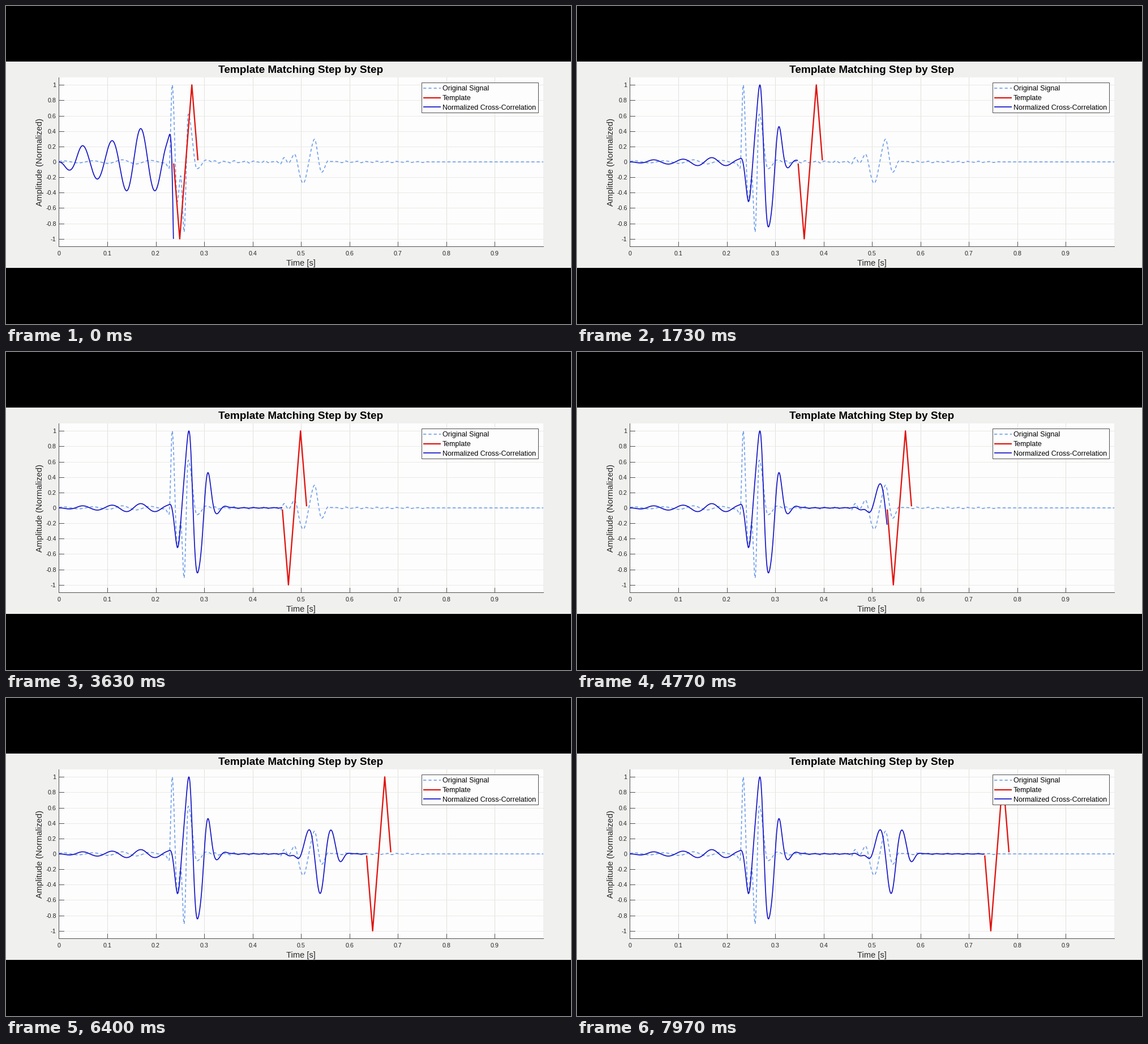
A matplotlib script that plays this animation: 998x561 px, repeating every 8 s.

```python
import numpy as np
import matplotlib
import matplotlib.pyplot as plt
from matplotlib.animation import FuncAnimation
from matplotlib.patches import Rectangle

W, H, DPI = 998, 561, 64
PT = 72 / DPI                      # points per pixel
FRAMES, LOOP_MS = 240, 8000
DT = 0.0005                        # sampling step, s
DARK, AXIS = "#262626", "#505050"
SKY, RED, BLUE = "#6a9bea", "#e0140f", "#1212c6"

matplotlib.rcParams["font.family"] = "Liberation Sans"


def px(t):
    return 93.4 + 855.6 * np.asarray(t)


def py(v):
    return 275 - 135.8 * np.asarray(v)


def swing(t, turns):
    """Smooth curve that eases from one turning point to the next."""
    x, y = np.array(turns).T
    i = np.clip(np.searchsorted(x, t, side="right") - 1, 0, len(x) - 2)
    u = np.clip((t - x[i]) / (x[i + 1] - x[i]), 0, 1)
    return y[i] + (y[i + 1] - y[i]) * u * u * (3 - 2 * u)


def wave(t, period, zero=0):
    return np.sin(2 * np.pi * (t - zero) / period)


# Turning points (s, amplitude) of the two bursts
BURSTS = [
    (.219, 0), (.2275, -.08), (.234, 1), (.2445, -.52), (.2515, -.18),
    (.2585, -.91), (.267, .62), (.285, -.09), (.306, .03), (.318, 0),
    (.448, 0), (.457, -.015), (.465, .045), (.474, -.012), (.4855, .095),
    (.5045, -.28), (.5275, .285), (.5425, -.13), (.558, .02), (.57, 0),
]


def signal(t):
    hum = .013 + .015 * np.exp(-((t - .145) / .05) ** 2)
    hum *= np.interp(t, [.215, .235], [1, 0])
    hiss = np.interp(t, [.29, .31, .75, .765], [0, .014, .007, 0])
    return (swing(t, BURSTS) + hum * wave(t, .06, .115)
            + hiss * (.8 * wave(t, .021) + .4 * wave(t, .0128)))


time = np.arange(0, 1 + DT, DT)
sig = signal(time)

TEMP_T = np.array([0, .0125, .0375, .05])
TEMP_V = np.array([-.02, -1, 1, .02])
kernel = np.interp(np.arange(0, .05, DT), TEMP_T, TEMP_V)
cor = np.convolve(sig, kernel)[2:2 + len(time)]

fig = plt.figure(figsize=(W / DPI, H / DPI), dpi=DPI, facecolor="black")
ax = fig.add_axes([0, 0, 1, 1])
ax.set_xlim(0, W)
ax.set_ylim(H, 0)
ax.axis("off")


def box(x0, y0, x1, y1, z, fill, edge="none"):
    ax.add_patch(Rectangle((x0, y0), x1 - x0, y1 - y0, fc=fill, ec=edge,
                           lw=PT, zorder=z))


def line(xs, ys, color, width, z, **kw):
    return ax.plot(xs, ys, color=color, lw=width * PT, zorder=z, **kw)[0]


def label(x, y, s, size, color=DARK, ha="center", z=4, va="baseline", **kw):
    ax.text(x, y, s, fontsize=size * PT, color=color, ha=ha, va=va,
            zorder=z, **kw)


DASH = dict(linestyle=(0, (3.3, 2.5)), dash_capstyle="butt")
SOLID = dict(solid_joinstyle="round", solid_capstyle="butt")

# Panel, grid and axes
box(0, 98, W, 462, 0, "#f0f0ef")
left, right, top, bottom = px(0), px(1), py(1.1), py(-1.1)
box(left, top, right, bottom, 1, "#fdfdfd")
for k in range(10):
    x = px(k / 10)
    if k:
        line([x, x], [top, bottom], "#e0e0dc", 1, 2)
    line([x, x], [bottom, bottom - 8.5], AXIS, 1, 3)
    label(x, 440.3, f"{k / 10:g}", 10.7)
for k in range(-5, 6):
    y = py(k / 5)
    line([left, right], [y, y], "#e9e9e6", 1, 2)
    line([left, left + 8.5], [y, y], AXIS, 1, 3)
    label(88.6, y + 4, f"{k / 5:g}", 10.7, ha="right")
line([left, left], [top, bottom], AXIS, 1, 3)
line([left, right], [bottom, bottom], AXIS, 1, 3)

label(521, 118.2, "Template Matching Step by Step", 19.05, "black",
      weight="bold")
label(521, 458.3, "Time [s]", 14.6)
label(60.3, 275, "Amplitude (Normalized)", 14.7, va="center", rotation=90)

# Curves
line(px(time), py(sig), SKY, 1.6, 5, **DASH)
red = line([], [], RED, 2.3, 6, **SOLID)
blue = line([], [], BLUE, 1.7, 7, **SOLID)

# Legend
box(734, 134.5, 940.5, 187.5, 8, "#fdfdfd", AXIS)
for row, (name, color, width, style) in enumerate([
        ("Original Signal", SKY, 1.6, DASH),
        ("Template", RED, 2.2, SOLID),
        ("Normalized Cross-Correlation", BLUE, 1.7, SOLID)]):
    y = 144.8 + 16.7 * row
    line([737, 768.5], [y, y], color, width, 9, **style)
    label(770.8, y + 4.6, name, 12.55, "black", ha="left", z=9)


def template_start(i):
    # Two samples per frame, slightly faster in two stretches
    return .237 + .002 * i + np.interp(i, [0, 50, 155, 213],
                                       [0, .0084, .0084, .0176])


def draw(i):
    start = template_start(i)
    red.set_data(px(start + TEMP_T), py(TEMP_V))
    end = start - DT
    n = np.searchsorted(time, end)
    t = np.append(time[:n], end)
    v = np.append(cor[:n], np.interp(end, time, cor))
    # The trace is rescaled by the largest value found so far.
    blue.set_data(px(t), py(v / np.abs(v).max()))
    return red, blue


anim = FuncAnimation(fig, draw, frames=FRAMES, interval=LOOP_MS / FRAMES,
                     repeat=True, repeat_delay=0, blit=False)
plt.show()
```
